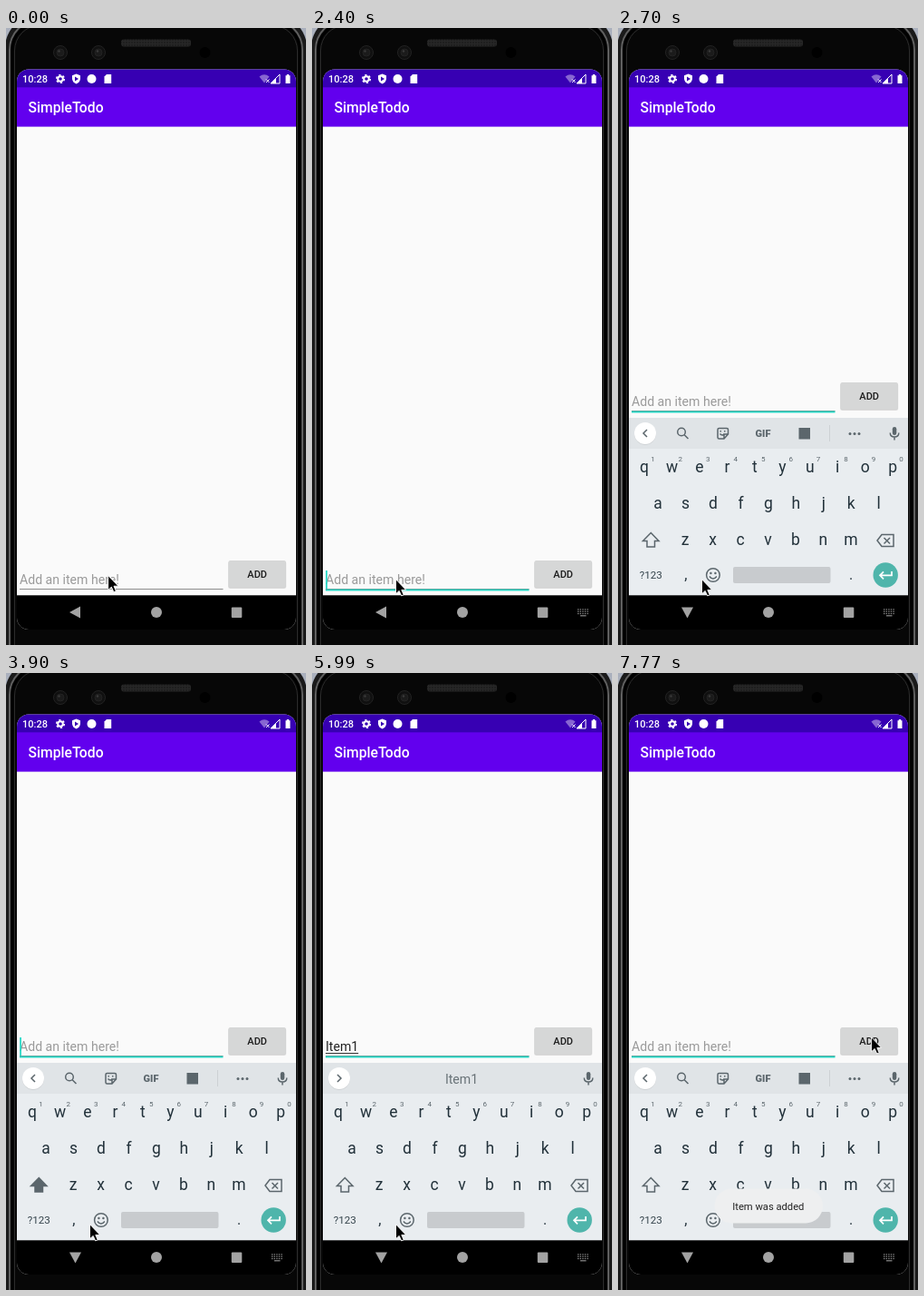
An HTML page that plays this animation: 331x679 px, repeating every 8000 ms.

```html
<!DOCTYPE html>
<html lang="en">
<head>
<meta charset="utf-8">
<title>Todo app</title>
<style>
html, body { margin: 0; width: 100%; height: 100%; overflow: hidden; background: #0b0b0b; }
svg { display: block; width: 331px; height: 679px; font-family: Roboto, "Noto Sans", sans-serif; }
.line { fill: none; stroke: #5b666c; stroke-width: 1.5; }
.mid { text-anchor: middle; }
</style>
</head>
<body>
<svg viewBox="0 0 331 679">
  <defs>
    <clipPath id="screen"><rect x="12" y="45.500" width="308" height="616.500" rx="13"/></clipPath>
    <clipPath id="page"><rect x="12" y="108.500" width="308" height="516.500"/></clipPath>
    <pattern id="mesh" width="3" height="3" patternUnits="userSpaceOnUse">
      <rect width="3" height="3" fill="#272727"/><circle cx="1" cy="1" r=".8" fill="#151515"/>
    </pattern>
  </defs>

  <!-- phone body -->
  <rect width="331" height="679" fill="#aab0bd"/>
  <rect x="-1" y="-14" width="333" height="760" rx="36" fill="#1a1a1a"/>
  <g fill="none">
    <rect x="4" y="-9" width="323" height="730" rx="33" stroke="#606060" stroke-width="2"/>
    <rect x="6.500" y="-6" width="318" height="720" rx="31" fill="#070707" stroke="#000" stroke-width="3"/>
    <rect x="9.500" y="-3" width="312" height="710" rx="28" stroke="#2c2c2c"/>
  </g>
  <rect x="127" y="12.500" width="77" height="8" rx="3" fill="url(#mesh)"/>
  <g stroke="#222" fill="#101010">
    <circle cx="60" cy="27" r="7.500"/><circle cx="102" cy="27" r="7.500"/>
    <circle cx="60" cy="27" r="4" fill="#1b1b1b"/><circle cx="102" cy="27" r="4" fill="#1b1b1b"/>
  </g>
  <g fill="#3a3a3a"><circle cx="58.500" cy="25.500" r="1.200"/><circle cx="101" cy="25.500" r="1.200"/></g>
  <circle cx="219.500" cy="27" r="6" fill="#000"/>

  <g clip-path="url(#screen)">
    <rect x="12" y="45" width="308" height="617" fill="#fafafa"/>
    <rect x="12" y="45" width="308" height="21" fill="#3700b3"/>
    <rect x="12" y="65.300" width="308" height="43.300" fill="#6200ee"/>
    <text x="24.500" y="93.300" font-size="15.700" font-weight="500" fill="#fff">SimpleTodo</text>
    <g fill="#fff">
      <text x="18" y="60" font-size="11" font-weight="500">10:28</text>
      <circle cx="60" cy="56" r="2.800" fill="none" stroke="#fff" stroke-width="2"/>
      <circle cx="60" cy="56" r="4.300" fill="none" stroke="#fff" stroke-width="1.600" stroke-dasharray="2.250"/>
      <path d="M77.500 50.500 82 52.300V56Q81.500 60 77.500 61.500 73.500 60 73 56V52.300Z"/>
      <path d="M76 53.500 80 56 76 58.500Z" fill="#3700b3"/>
      <circle cx="94.500" cy="56" r="5"/>
      <path d="M111 51H116.200V61H108.500V53.500Z"/>
      <path d="M302 51V61H292Z" fill="none" stroke="#fff"/><path d="M298 55V61H292Z"/>
      <path d="M279.500 53.500Q285 49 290.500 53.500L285 60.500Z" opacity=".4"/>
      <path d="M287 56.500 290.500 60M290.500 56.500 287 60" stroke="#fff"/>
      <path d="M309.800 51H312.200V52.200H313.500V61H308.500V52.200H309.800Z"/>
    </g>

    <g clip-path="url(#page)">
      <g id="form">
        <text id="hint" x="15" y="612.300" font-size="14.100" fill="#9a9a9a">Add an item here!</text>
        <text id="typed" x="15" y="612.300" font-size="14.100" fill="#212121"></text>
        <rect id="under" x="15" y="614" height="1" fill="#333"/>
        <rect x="15" y="617" width="224.500" height="1" fill="#8c8c8c"/>
        <rect id="focus" x="15" y="617.600" width="224.500" height="1.800" fill="#1fd6c4"/>
        <rect id="caret" y="597" width="1.700" height="20" fill="#1fd6c4"/>
        <rect x="245" y="587" width="64.300" height="30" rx="2" fill="#000" opacity=".08"/>
        <rect x="245.500" y="586.500" width="63.300" height="30" rx="2" fill="#000" opacity=".1"/>
        <rect id="button" x="245.500" y="586" width="63.300" height="29.800" rx="2"/>
        <text class="mid" x="277.200" y="604.700" font-size="11" font-weight="500" fill="#1c1c1c">ADD</text>
      </g>

      <g id="board">
        <rect x="12" y="429" width="308" height="197" fill="#e9edf0"/>
        <rect x="12" y="429" width="308" height="34" fill="#e0e4e7"/>
        <circle cx="30" cy="446.700" r="12" fill="#c9cdd0"/>
        <circle cx="30" cy="446" r="12" fill="#fff"/>
        <path id="chevron" class="line" d="M-2 -4 2 0 -2 4" stroke-width="1.600"/>
        <g id="tools">
          <circle class="line" cx="70" cy="444.500" r="4.300"/><path class="line" d="M73 447.500 77.500 452"/>
          <path class="line" d="M111.500 440.500H120Q121.500 440.500 121.500 442V447L117 452H111.500Q110 452 110 450.500V442Q110 440.500 111.500 440.500ZM121.500 447H117V452M112.500 446.500Q115 449.500 117.500 446.500" stroke-width="1.300"/>
          <path d="M112.500 443h1.500v1.500h-1.500zM117 443h1.500v1.500h-1.500z" fill="#5b666c"/>
          <text class="mid" x="160" y="450" font-size="11" font-weight="900" fill="#5b666c">GIF</text>
          <rect x="199.500" y="440" width="12.500" height="12.500" fill="#5b666c"/>
          <rect x="233" y="437" width="1" height="18" fill="#cdd1d4"/>
          <g fill="#5b666c"><circle cx="256" cy="446.500" r="1.500"/><circle cx="261" cy="446.500" r="1.500"/><circle cx="266" cy="446.500" r="1.500"/></g>
        </g>
        <g id="words" font-size="14.100" fill="#687277">
          <text class="mid" x="81" y="452"></text>
          <text class="mid" x="165" y="452"></text>
          <text class="mid" x="250" y="452"></text>
        </g>
        <path id="bars" d="M120.500 437V456M210.500 437V456" stroke="#cdd1d4"/>
        <rect x="302.800" y="439" width="4.500" height="9" rx="2.250" fill="#5b666c"/>
        <path class="line" d="M300.300 445.500Q300.300 450 305 450 309.800 450 309.800 445.500M305 450V453.500" stroke-width="1.300"/>

        <g id="keys" fill="#22313a"></g>
        <path id="shift" class="line" d="M36.300 555.500 45 564.500H40.500V571H32V564.500H27.500Z"/>
        <path class="line" d="M291 557.500H304V570.500H291L286 564ZM293.500 561 300 567.500M300 561 293.500 567.500"/>
        <text class="mid" x="36.300" y="606" font-size="11.600" fill="#34434b">?123</text>
        <g transform="translate(104.900 602)">
          <circle class="line" r="7.300"/>
          <path class="line" d="M-4 1.500Q0 6.500 4 1.500"/>
          <g fill="#5b666c"><circle cx="-2.500" cy="-2" r="1.200"/><circle cx="2.500" cy="-2" r="1.200"/></g>
        </g>
        <rect x="127" y="593" width="107.500" height="18" rx="2" fill="#c8cbce"/>
        <g transform="translate(295.200 602)">
          <circle r="13.700" fill="#4fb5ab"/>
          <path d="M6.800 -4V.3H-5.700M-2.200 -3.700 -6.200 .3 -2.200 4.300" fill="none" stroke="#fff" stroke-width="1.700"/>
        </g>
      </g>

      <g id="toast">
        <rect x="106.500" y="567.500" width="119.500" height="38" rx="19" fill="#eeeff0"/>
        <text class="mid" x="165.800" y="591" font-size="11.200" fill="#222">Item was added</text>
      </g>
    </g>

    <rect x="12" y="624.300" width="308" height="38" fill="#000"/>
    <g fill="#a3a3a3">
      <path id="back" d="M-6.500 0 5.500 -6.500V6.500Z"/>
      <circle cx="166" cy="643" r="6"/>
      <rect x="248.800" y="637.500" width="11.500" height="11.500" rx="1"/>
      <g id="kbIcon" opacity="0" fill="#8c8c8c"></g>
    </g>
  </g>

  <path id="mouse" d="M0 0V16L3.700 12.700 6.200 18.200 8.700 17.100 6.300 11.700H11.200Z" fill="#000" stroke="#fff" stroke-width=".9"/>
</svg>
<script>
const LOOP = 8000;
const $ = id => document.getElementById(id);
const steps = [0, 1350, 1500, 1950, 2100, 2250, 2400, 2550, 2700, 3000, 3450, 3900, 4050, 4200,
  4500, 4650, 4800, 4940, 5090, 5390, 5990, 6140, 6290, 6430, 6580, 6730, 7030, 7180, 7330, 7470, 7620, 7770];
const typing = [[0, ""], [4050, "I"], [4650, "It"], [4800, "Ite"], [4940, "Item"], [5390, "Item1"], [7330, ""]];
const guesses = [[0, ""], [4050, "I,I'm,If"], [4650, "It's,It,Its"], [4940, "Ite,Item,Items"],
  [5090, "Items,Item,ITEM"], [5390, ",Item1,"], [7330, ""]];
// the caret toggles at each of these times
const blinks = [1950, 2550, 3000, 3450, 3900, 4500, 4650, 5990, 6430, 7030, 7330, 7770];

const last = (list, t) => list.filter(e => e[0] <= t).pop()[1];
const ramp = (t, a, b) => Math.min(1, Math.max(0, (t - a) / (b - a)));
const ease = p => p * p * (3 - 2 * p);
const show = (id, v) => $(id).setAttribute("opacity", +v);
const move = (id, x, y, more = "") => $(id).setAttribute("transform", `translate(${x} ${y}) ${more}`);

function addText(s, x, y, size, color) {
  const e = document.createElementNS("http://www.w3.org/2000/svg", "text");
  e.textContent = s;
  e.setAttribute("class", "mid");
  e.setAttribute("x", x);
  e.setAttribute("y", y);
  e.setAttribute("font-size", size);
  if (color) e.setAttribute("fill", color);
  $("keys").append(e);
}

[["qwertyuiop", 29.1, 489.3], ["asdfghjkl", 44.1, 529], ["zxcvbnm", 74.2, 568.5]].forEach(([row, x, y], r) =>
  [...row].forEach((c, i) => {
    addText(c, x + i * 30.45, y, 17.5);
    if (!r) addText((i + 1) % 10, x + 9.3 + i * 30.45, 477, 8, "#5b666c");
  }));
addText(",", 74.9, 607, 16);
addText(".", 257.2, 607, 16);

let dots = "";
for (let r = 0; r < 3; r++)
  for (let c = 0; c < 5; c++) dots += `<rect x="${293 + c * 2.6}" y="${639.3 + r * 2.3}" width="1.4" height="1.2"/>`;
$("kbIcon").innerHTML = dots + '<rect x="296" y="646.2" width="6.5" height="1.2"/>';

function mousePos(t) {
  const a = ramp(t, 1200, 1500), b = ease(ramp(t, 5990, 6650));
  return [112.7 - 20.2 * a + 187 * b, 602.5 + 4.2 * a + 14 * Math.sin(Math.PI * a) - 205.9 * b];
}

function draw(now) {
  const t = steps.filter(s => s <= now % LOOP).pop();
  const text = last(typing, t), words = last(guesses, t).split(",");
  const open = t >= 2550, sugg = words.length > 1;

  move("form", 0, open ? -196 : 0);
  move("board", 0, 197 * (1 - ease(ramp(t, 2400, 2700))));
  show("board", open);
  move("back", 76.5, 643, open ? "rotate(-90)" : "");
  show("kbIcon", t >= 2400);

  $("typed").textContent = text;
  const w = text ? $("typed").getComputedTextLength() : 0;
  $("under").setAttribute("width", w);
  show("hint", !text);
  show("focus", ramp(t, 1800, 2100));
  $("caret").setAttribute("x", 15.2 + w);
  show("caret", blinks.filter(b => b <= t).length % 2);

  move("chevron", 30, 446, sugg ? "" : "scale(-1 1)");
  show("tools", !sugg);
  show("bars", words[0] !== "");
  [...$("words").children].forEach((e, i) => e.textContent = words[i] || "");
  $("shift").style.fill = t >= 3900 && t < 4200 ? "#5b666c" : "none";

  $("button").setAttribute("fill", t >= 7180 && t < 7470 ? "#c2c3c3" : "#d6d7d7");
  show("toast", ease(ramp(t, 7330, 7700)));
  move("mouse", ...mousePos(t));
}

function tick() {
  draw(performance.now());
  requestAnimationFrame(tick);
}
tick();
</script>
</body>
</html>
```
